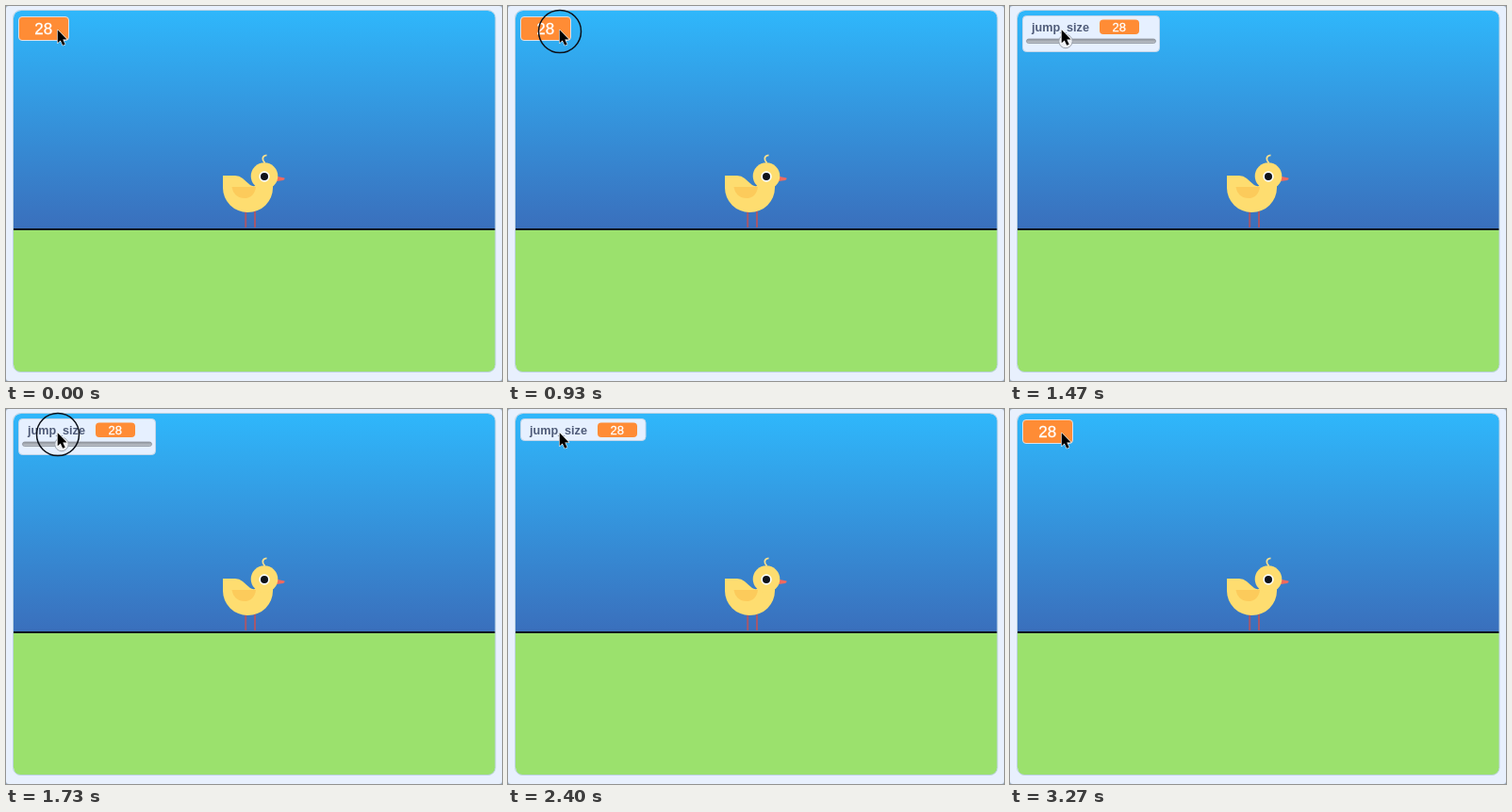
Animation of 526x398 px, one loop 3.34 s. Source, as an HTML page:

```html
<!DOCTYPE html>
<html lang="en">
<head>
<meta charset="utf-8">
<title>Variable display</title>
<style>
html, body { margin: 0; width: 100%; height: 100%; overflow: hidden; background: #9fb0c4; }
svg { display: block; width: 526px; height: 398px; }
text { font-family: "Liberation Sans", Arial, sans-serif; }
.name { font-size: 12.6px; font-weight: bold; fill: #4f5b78; }
.num { fill: #fff; stroke: #fff; stroke-width: .3px; text-anchor: middle; }
.panel { fill: #e6f0ff; stroke: #c3d5e8; }
.pill { fill: #ff8c35; }
</style>
</head>
<body>
<svg viewBox="0 0 526 398">
  <defs>
    <linearGradient id="sky" x1="0" y1="0" x2="0" y2="1">
      <stop offset="0" stop-color="#2fb7fb"/>
      <stop offset="1" stop-color="#3a6fbc"/>
    </linearGradient>
    <linearGradient id="groove" x1="0" y1="0" x2="0" y2="1">
      <stop offset="0" stop-color="#8f959d"/>
      <stop offset="1" stop-color="#c3c8cf"/>
    </linearGradient>
    <clipPath id="stage"><rect x="8" y="5" width="511" height="383.5" rx="8"/></clipPath>
    <g id="readout">
      <text class="name" x="23" y="27">jump_size</text>
      <rect class="pill" x="95" y="14.5" width="42" height="15.5" rx="4"/>
      <text class="num" x="115.7" y="26.7" font-size="13">28</text>
    </g>
  </defs>

  <rect width="526" height="398" rx="3" fill="#e8f0fd"/>
  <g clip-path="url(#stage)">
    <rect x="8" y="5" width="511" height="232" fill="url(#sky)"/>
    <rect x="8" y="237" width="511" height="152" fill="#9be16d"/>
    <rect x="8" y="236" width="511" height="2" fill="#0b1420"/>
  </g>
  <rect x="7.5" y="4.5" width="511.5" height="384" rx="8" fill="none" stroke="#bdd3e2"/>

  <g id="chick">
    <path d="M254.2 218V235M264 218V235" stroke="#a6586c" stroke-width="2"/>
    <path d="M287 180.8L295.5 182.6Q296 184.4 294 185L287 186Z" fill="#ee6a5f"/>
    <path d="M230 180H243Q247.500 180 251 183L259 190Q261 191.500 264 191L283 188V193A26.500 26 0 0 1 230 193Z" fill="#fedd70"/>
    <circle cx="274" cy="180.500" r="14.300" fill="#fedd70"/>
    <path d="M239.500 192H265C264 200 259 204 253 204C246 204 241 200 239.500 192Z" fill="#fccb5b"/>
    <path d="M274.500 166.500C271.500 164 271 159 276.500 158.300" fill="none" stroke="#fbe08c" stroke-width="1.800"/>
    <circle cx="274" cy="181" r="5.700" fill="#fff"/>
    <circle cx="274" cy="181" r="4" fill="#10131a"/>
  </g>

  <g id="large">
    <rect class="pill" x="13.500" y="11.500" width="53" height="25" rx="3.500" stroke="#dbe0e8"/>
    <text class="num" x="39.700" y="30" font-size="17">28</text>
  </g>
  <g id="slider">
    <rect class="panel" x="13.500" y="10.500" width="145" height="38" rx="4"/>
    <use href="#readout"/>
    <rect x="17.500" y="35" width="137" height="4.500" rx="2.250" fill="url(#groove)" stroke="#8d949e" stroke-width=".8"/>
    <circle cx="59" cy="37.500" r="7.200" fill="#eef1f5" stroke="#9ba2ac"/>
  </g>
  <g id="normal">
    <rect class="panel" x="13.500" y="10.500" width="132.500" height="23" rx="4"/>
    <use href="#readout"/>
  </g>

  <circle id="ring" cx="55" cy="27" r="22.500" fill="none" stroke="#0c1018" stroke-width="1.500"/>
  <path d="M54.700 25.300V39.300L57.800 36.400L60.200 41.800L62.700 40.700L60.300 35.500H64.600Z"
        fill="#000" stroke="#fff" stroke-width="1.100" stroke-linejoin="round" paint-order="stroke"/>
</svg>
<script>
const LOOP = 3340;
// Each double click moves the monitor on to its next form.
const modes = [[0, "large"], [1000, "slider"], [1930, "normal"], [2930, "large"]];
const presses = [[800, 870], [930, 1000], [1730, 1800], [1870, 1930], [2800, 2870], [2930, 3000]];
const show = (id, on) => {
  document.getElementById(id).style.display = on ? "" : "none";
};

function draw(now) {
  const t = now % LOOP;
  const mode = modes.filter(([start]) => t >= start).pop()[1];
  for (const id of ["large", "slider", "normal"]) show(id, id === mode);
  show("ring", presses.some(([down, up]) => t >= down && t < up));
}

const start = performance.now();
function tick() {
  draw(performance.now() - start);
  requestAnimationFrame(tick);
}
tick();
</script>
</body>
</html>
```
